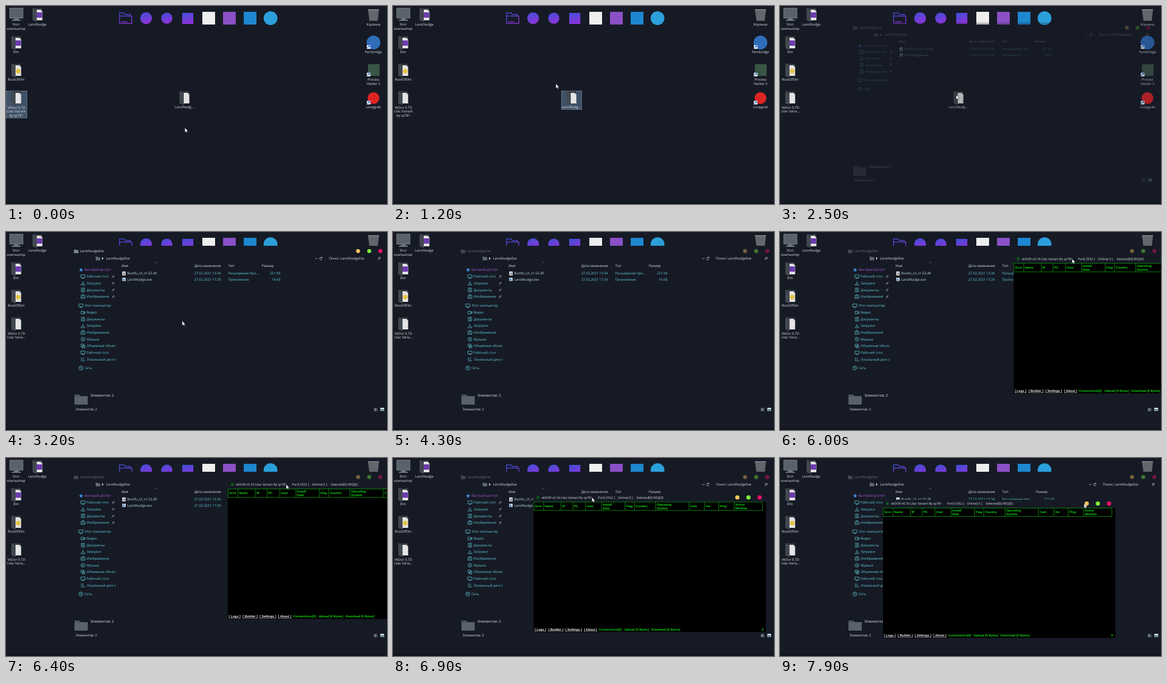
These frames come from a looping animation (718x374 px, 8 s). An HTML page:

```html
<!DOCTYPE html>
<html lang="ru">
<head>
<meta charset="utf-8">
<title>Desktop</title>
<style>
html, body { margin: 0; width: 100%; height: 100%; overflow: hidden; background: #161a25; }
svg { display: block; width: 718px; height: 374px; }
text { font-family: "Open Sans", "Noto Sans", sans-serif; font-size: 6.3px; fill: #e4e7ec; white-space: pre; text-rendering: geometricPrecision; }
.mono text { font-family: "Liberation Sans", Arial, sans-serif; font-size: 6px; font-weight: bold; fill: #12d812; }
.mono .link { fill: #f2f2f2; text-decoration: underline; }
</style>
</head>
<body>
<svg id="stage" viewBox="0 0 718 374">
  <defs>
    <linearGradient id="neon" x1="0" y1="0" x2="0.4" y2="1">
      <stop offset="0" stop-color="#3c50d8"/><stop offset="1" stop-color="#8a34d8"/>
    </linearGradient>
    <clipPath id="side"><rect x="120" y="60" width="87" height="210"/></clipPath>
  </defs>
</svg>
<script>
const LOOP = 8000, BG = '#161a25', CYAN = '#64d4dc', GREEN = '#0fae0f';
const stage = document.getElementById('stage');

function add(parent, tag, attrs = {}, str) {
  const el = document.createElementNS('http://www.w3.org/2000/svg', tag);
  for (const k in attrs) el.setAttribute(k, attrs[k]);
  if (str !== undefined) el.textContent = str;
  parent.appendChild(el);
  return el;
}
const group = (p, attrs) => add(p, 'g', attrs);
const box = (p, x, y, w, h, fill, more) => add(p, 'rect', { x, y, width: w, height: h, fill, ...more });
const dot = (p, cx, cy, r, fill, more) => add(p, 'circle', { cx, cy, r, fill, ...more });
const line = (p, d, stroke, w = 0.8) => add(p, 'path', { d, stroke, 'stroke-width': w, fill: 'none' });
// y is the middle of the lower-case letters
const text = (p, x, y, str, style = '', more) => add(p, 'text', { x, y: y + 2.1, style, ...more }, str);
const label = (p, x, y, lines) => lines.forEach((s, i) =>
  text(p, x, y + i * 7.8, s, '', { 'text-anchor': 'middle' }));
const show = (el, on) => el.setAttribute('visibility', on ? 'visible' : 'hidden');

// Desktop
const desk = group(stage);
box(desk, 0, 0, 718, 374, BG);
box(desk, 0, 370, 718, 4, '#12151f');

function selection(x, y, w, h) {
  return box(desk, x + 0.5, y + 0.5, w - 1, h - 1, '#3f5167', { stroke: '#74869a', 'stroke-width': 0.8 });
}
const selLeft = selection(0, 160, 40, 52);
const selMid = selection(317, 160, 39, 36);

function folder(x, y, mark, round) {
  const g = group(desk, { transform: `translate(${x} ${y})` });
  add(g, 'path', { d: 'M0 1H18V24H0Z', fill: '#33383f' });
  add(g, 'path', { d: 'M8 4H15.5L18.5 7V24H8Z', fill: '#e4e4e4' });
  add(g, 'path', { d: 'M15.5 4V7H18.5Z', fill: '#aeb1b5' });
  add(g, 'path', { d: 'M0 1L8 5V27L0 24Z', fill: '#42484f' });
  if (round) dot(g, 13, 15, 4.5, mark);
  else if (mark) box(g, 8, 9, 10, 10, mark);
}
function shortcut(x, y) {
  box(desk, x, y, 7, 7, '#eef2f6');
  line(desk, `M${x + 1.5} ${y + 5.7}Q${x + 1.5} ${y + 3} ${x + 5} ${y + 2.2}M${x + 3} ${y + 1.3}H${x + 5.6}V${y + 4}`, '#1d5fc0', 1.1);
}

box(desk, 7, 4, 25, 19, '#59616b', { stroke: '#8b929b', 'stroke-width': 0.8 });
add(desk, 'path', { d: 'M15 23.5H24V26H28V28H11V26H15Z', fill: '#727984' });
label(desk, 19, 35, ['Этот', 'компьютер']);
folder(50, 3, '#6c3bb0'); label(desk, 59, 35, ['LarotNudge']);
folder(10, 56, '#6c3bb0'); label(desk, 19, 87, ['Elm']);
folder(10, 108, '#e3c548', true); label(desk, 19, 139, ['RootOfElm']);
folder(10, 160);
const longName = group(desk), shortName = group(desk);
label(longName, 19.5, 191.5, ['VkDor 0.7D', 'Lilac Variant', 'by qz781']);
label(shortName, 19.5, 191.5, ['VkDor 0.7D', 'Lilac Varia...']);
folder(327, 160); label(desk, 336, 191, ['LarotNudg...']);

add(desk, 'path', { d: 'M682 6H703L700.5 28H685Z', fill: '#63666c' });
add(desk, 'path', { d: 'M682 6H703L702.6 8H682.4Z', fill: '#7c7f85' });
label(desk, 692.5, 35, ['Корзина']);
dot(desk, 692.5, 69, 13, '#2f6dbb'); shortcut(680, 74);
label(desk, 692.5, 87, ['Fernbridge']);
box(desk, 682, 110, 22, 22, '#3a5546'); shortcut(680, 126);
label(desk, 692.5, 139, ['Process', 'Hacker 2']);
dot(desk, 692.5, 174, 11, '#dd2424'); shortcut(680, 179);
label(desk, 692.5, 191, ['Loopgrab']);

// Dock
line(desk, 'M214 19V13H222L225 16H234V19M214 19H237V33H214ZM217 30H229', 'url(#neon)', 1.5);
dot(desk, 264, 23, 11, 'url(#neon)');
dot(desk, 303, 23, 10.5, 'url(#neon)');
box(desk, 332, 13, 21, 21, 'url(#neon)');
box(desk, 370, 11, 24, 24, '#eeeeee');
box(desk, 409, 11, 24, 24, '#8b50c6');
box(desk, 448, 11, 24, 24, '#1d87cf');
dot(desk, 498.5, 23, 13, '#2b9fda');

const band = box(desk, 0, 0, 0, 0, '#4a78b0', { 'fill-opacity': 0.3, stroke: '#5f8fc8', 'stroke-width': 0.7 });

function buttons(p, xs, y, r) {
  ['#f2c25c', '#7cf03a', '#f5106c'].forEach((c, i) => dot(p, xs[i], y, r, c));
}

// File window
const files = group(stage);
box(files, 122, 26, 596, 319, BG);
const caption = group(files);
const folderPath = (x, y) => `M${x} ${y}h3l1 1h4.5v6h-8.5Z`;
add(caption, 'path', { d: folderPath(128, 33), fill: '#7d848d' });
text(caption, 139.5, 36, 'LarotNudgeExe');
buttons(caption, [663.5, 684.5, 705.5], 36, 3.8);
add(files, 'path', { d: folderPath(169, 46.5), fill: '#626973' });
add(files, 'path', { d: 'M181 47.5L184 50L181 52.5Z', fill: '#d8dce2' });
text(files, 188.5, 50, 'LarotNudgeExe');
line(files, 'M582.5 49L584.7 51.2L587 49', '#c5cad1');
line(files, 'M595 48.5A2.4 2.4 0 1 0 595.6 51M595.5 46.6V49H593', '#c5cad1');
text(files, 608.5, 50, 'Поиск: LarotNudgeExe');
dot(files, 703.7, 49.3, 1.8, 'none', { stroke: '#d8dce2', 'stroke-width': 0.8 });
line(files, 'M702.4 50.7L700.6 52.6', '#d8dce2');
line(files, 'M281 58.8L283.3 56.6L285.6 58.8', '#8b929c', 0.7);
[[217.5, 'Имя'], [355, 'Дата изменения'], [419, 'Тип'], [482, 'Размер']]
  .forEach(([x, s]) => text(files, x, 63.5, s));

[['Bunifu_UI_v1.52.dll', '15:34', 'Расширение при...', '221 КБ'],
 ['LarotNudge.exe', '17:29', 'Приложение', '16 КБ']].forEach(([name, time, type, size], i) => {
  const y = 78 + i * 12, c = 'fill:' + CYAN;
  box(files, 219, y - 3.5, 6.5, i ? 6 : 7.5, '#d9dde2');
  if (i) box(files, 220, y - 1.5, 3, 3, '#2b7fd0');
  else dot(files, 222.5, y + 0.8, 1.8, '#6d7680');
  text(files, 228.5, y, name, 'fill:#c4e8ee');
  text(files, 355, y, '27.02.2021 ' + time, c);
  text(files, 418.5, y, type, c);
  text(files, 517.5, y, size, c, { 'text-anchor': 'end' });
});

const glyphs = {
  screen: 'M-4 -3H4V2.2H-4ZM-2 3.6H2',
  load: 'M0 -3.5V1.5M-2 -.5L0 1.6L2 -.5M-3.5 1.5V3.5H3.5V1.5',
  doc: 'M-3 -3.5H3V3.5H-3ZM0 -2V2M-1 -1.5H1M-1 1.5H1',
  image: 'M-3.7 -2.2H3.7V3.2H-3.7ZM-2 -3.7H2M-2 2L0 -.3L2 2',
  video: 'M-3.7 -2.2H1.5V2.6H-3.7ZM1.5 0L4 -1.6V2L1.5 .6',
  music: 'M3.6 0A3.6 3.6 0 1 1 -3.6 0A3.6 3.6 0 1 1 3.6 0M1 0A1 1 0 1 1 -1 0A1 1 0 1 1 1 0',
  cube: 'M-3.5 -3.5H1.5V1.5H-3.5ZM-1 -1H3.7V3.7H-1Z',
  disk: 'M-4 -2.5H-1M0 -2.5H2M-4 0H-1M0 0H2M-4 2.8H4',
  net: 'M3.8 0A3.8 3.8 0 1 1 -3.8 0A3.8 3.8 0 1 1 3.8 0M-2 -2L2 2.4M-1 0L1.6 -2'
};
function entry(p, y, icon, str, top) {
  const g = group(p, { transform: `translate(${top ? 141 : 145} ${y})` });
  line(g, glyphs[icon], CYAN, 0.8);
  text(p, top ? 148 : 152, y, str, 'fill:' + CYAN);
}
const side = group(files, { 'clip-path': 'url(#side)' });
add(side, 'path', { d: 'M141.5 67.3L142.6 70L145.5 70.2L143.3 72L144 75L141.5 73.4L139 75L139.7 72L137.5 70.2L140.4 70Z', fill: '#3f8ee0' });
text(side, 148, 71, 'Быстрый доступ', 'fill:#b45ae0');
const quick = [['screen', 'Рабочий стол'], ['load', 'Загрузки'], ['doc', 'Документы'], ['image', 'Изображения']];
quick.forEach(([icon, s], i) => {
  const y = 84 + i * 12.7;
  entry(side, y, icon, s);
  line(side, `M199.5 ${y + 2.8}L201.5 ${y + 0.5}M200.3 ${y - 0.8}L203 ${y + 1.8}M201.3 ${y}L203 ${y - 2.2}L204.3 ${y - 0.8}L202.4 ${y + 1}`, '#aab2bc', 0.8);
});
entry(side, 139, 'screen', 'Этот компьютер', true);
const closed = group(side), open = group(side);
entry(closed, 156, 'net', 'Сеть', true);
[['video', 'Видео'], ['doc', 'Документы'], ['load', 'Загрузки'], ['image', 'Изображения'], ['music', 'Музыка'],
 ['cube', 'Объемные объекты'], ['screen', 'Рабочий стол'], ['disk', 'Локальный диск (C:)']]
  .forEach(([icon, s], i) => entry(open, 152 + i * 12.65, icon, s));
entry(open, 257, 'net', 'Сеть', true);

add(files, 'path', { d: 'M129 307H138L141 310H154V326H129Z', fill: '#4b535b' });
add(files, 'path', { d: 'M129 311H140L142 310H154V326H129Z', fill: '#59626a' });
text(files, 159, 309, 'Элементов: 2', 'font-size:6.9px');
text(files, 131, 335, 'Элементов: 2');
line(files, 'M694.5 332.5V338.5M697 332.5V338.5', '#9aa1aa', 1.6);
line(files, 'M699.5 332.5V338.5', '#5f6770', 1);
box(files, 705.5, 332, 7, 6, '#c9dff0');
box(files, 706.5, 335, 5, 2, '#42566a');

// Console window, drawn from its own corner
const consoleWin = group(stage);
const panel = group(consoleWin);
box(panel, 0, 0, 438, 261, BG);
box(panel, 0, 15, 438, 246, '#000');
box(panel, 6, 4.5, 5, 5, '#0d5c14');
[[15, 'vkDOR v0.7d Lilac Variant By qz781'], [121, 'Port[ 5552 ]'], [158.5, 'Online[ 0 ]'], [194, 'Selected[0] REQ[0]']]
  .forEach(([x, s]) => text(panel, x, 7, s, 'font-size:5.9px'));
buttons(panel, [384, 405, 426], 7, 4);
const grid = group(panel, { class: 'mono' });
[['Scre', 0], ['Name', 18.5], ['IP', 51.5], ['PC', 73.5], ['User', 97.5], ['Install Date', 128], ['Flag', 172],
 ['Country', 189.5], ['Operating System', 229.5], ['Cam', 292.5], ['Ver', 321.5], ['Ping', 348.5], ['Active Window', 377.5]]
  .forEach(([s, x]) => {
    const words = s.split(' ');
    line(grid, `M${x + 0.5} 15V31`, GREEN);
    words.forEach((w, k) => text(grid, x + 2.7, words.length > 1 ? 20 + k * 7 : 23, w, 'font-size:5.9px'));
  });
line(grid, 'M0 15.5H431.5V31.5H0', GREEN);
[[2, '[ Logs ]'], [28, '[ Builder ]'], [60, '[ Settings ]'], [95, '[ About ]']]
  .forEach(([x, s]) => text(grid, x, 256, s, '', { class: 'link' }));
[[123, 'Connections[0]'], [171, 'Upload [0 Bytes]'], [221.5, 'Download [0 Bytes]'], [430, 'II']]
  .forEach(([x, s]) => text(grid, x, 256, s, 'font-size:5.9px'));

const cursor = add(stage, 'path', { d: 'M0 0V8.4L2 6.7L3.4 9.6L4.8 9L3.5 6.2H6Z', fill: '#fff', stroke: '#15171d', 'stroke-width': 0.5 });

// time, x, y
const path = [
  [0, 337, 230], [300, 337, 230], [600, 372, 262], [1100, 307, 147], [1200, 307, 147], [1500, 332, 168],
  [3400, 332, 168], [4100, 300, 378], [4500, 300, 376], [5100, 342, 45], [5300, 336, 69],
  [6100, 560, 50], [6200, 556, 50], [6400, 528, 50], [7200, 304, 86], [7400, 304, 86], [7900, 573, 86]
];
const ease = k => k * k * (3 - 2 * k);
function at(t) {
  const i = path.findIndex(p => p[0] > t);
  if (i < 0) return path[path.length - 1].slice(1);
  const a = path[i - 1], b = path[i], k = ease((t - a[0]) / (b[0] - a[0]));
  return [a[1] + (b[1] - a[1]) * k, a[2] + (b[2] - a[2]) * k];
}
function fadeIn(el, t, start, cx, cy) {
  const k = Math.min(2, Math.floor((t - start) / 100));
  show(el, k >= 0);
  if (k < 0) return;
  const s = [0.964, 0.988, 1][k];
  el.setAttribute('opacity', [0.24, 0.7, 1][k]);
  el.setAttribute('transform', `translate(${cx * (1 - s)} ${cy * (1 - s)}) scale(${s})`);
}

function draw(t) {
  const [x, y] = at(t);
  cursor.setAttribute('transform', `translate(${x} ${y})`);
  show(selLeft, t < 600);
  show(selMid, t >= 1000 && t < 2300);
  selMid.setAttribute('fill', t >= 1500 ? '#4d6078' : '#3f5167');
  show(longName, t < 1700);
  show(shortName, t >= 1700);

  show(band, t > 600 && t < 1100);
  const rect = { x, y, width: Math.max(0, 372 - x), height: Math.max(0, 262 - y) };
  for (const k in rect) band.setAttribute(k, rect[k]);

  fadeIn(files, t, 2500, 389, 172);
  // children override the visibility of their parent, so use display here
  closed.style.display = t < 2800 ? '' : 'none';
  open.style.display = t < 2800 ? 'none' : '';
  caption.setAttribute('opacity', t < 4200 ? 1 : 0.42);

  fadeIn(consoleWin, t, 4600, 445, 192);
  const [wx, wy] = at(Math.min(7200, Math.max(5300, t)));
  panel.setAttribute('transform', `translate(${wx - 110} ${wy - 7})`);
}

const start = performance.now();
function tick(now) {
  const t = Math.max(0, now - start) % LOOP;
  draw(Math.floor(t / 100) * 100);
  requestAnimationFrame(tick);
}
draw(0);
requestAnimationFrame(tick);
</script>
</body>
</html>
```
